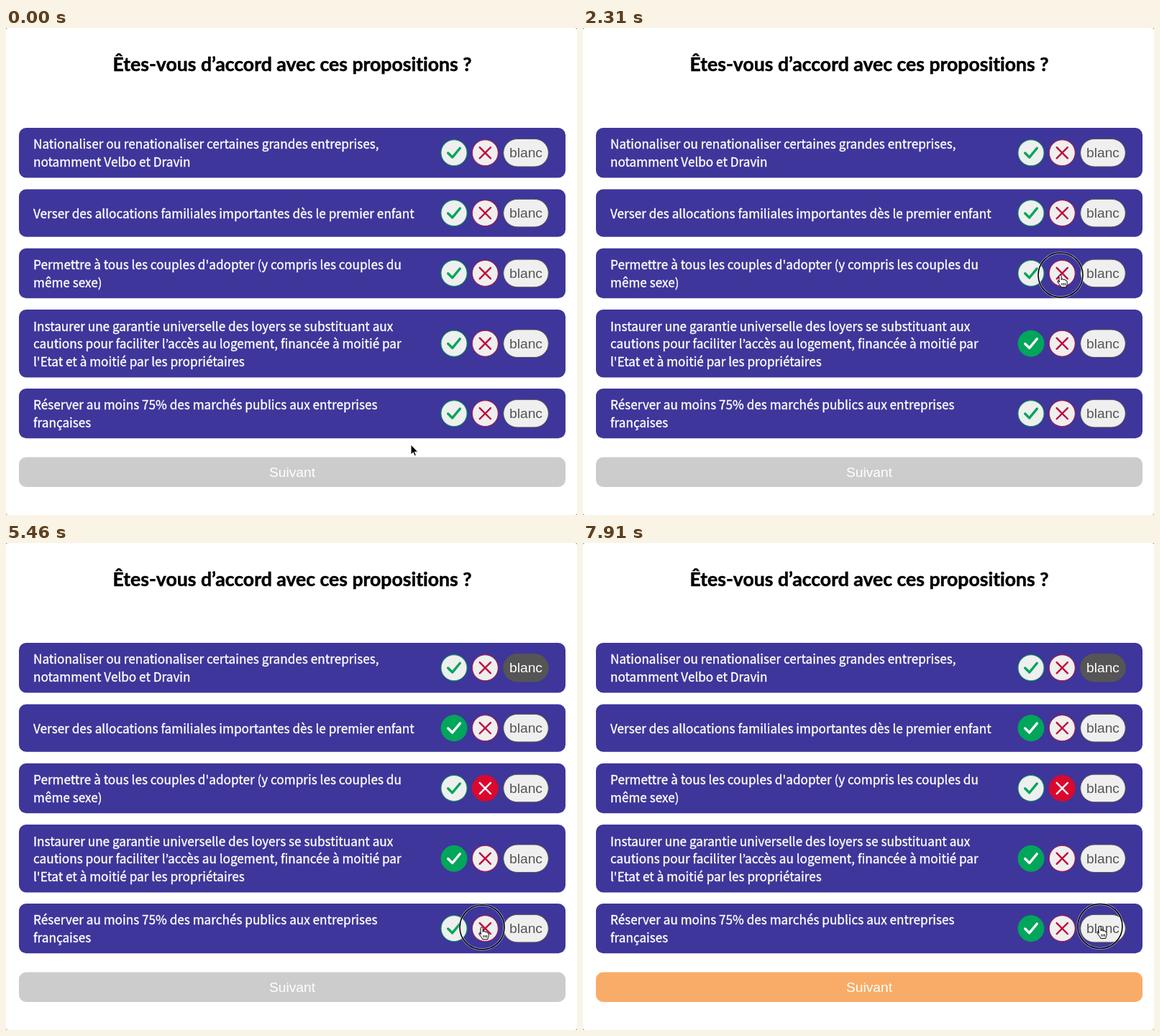
Animation of 794 by 678 pixels, one loop 8 s. Source, as an HTML page:

```html
<!DOCTYPE html>
<html lang="fr">
<head>
<meta charset="utf-8">
<title>Propositions</title>
<style>
  html, body { margin: 0; width: 100%; height: 100%; overflow: hidden; background: #888; }
  svg { display: block; width: 794px; height: 678px; }
  .title { font: 700 26.6px Lato, sans-serif; font-variant-ligatures: none; text-anchor: middle; stroke: #000; stroke-width: .5; }
  .statement { font: 400 17.17px "Noto Sans CJK KR", "Noto Sans CJK JP", sans-serif; fill: #fff; stroke: #fff; stroke-width: .35; }
  .label { font: 19.2px "Liberation Sans", Arial, sans-serif; text-anchor: middle; fill: #fff; }
  .option { --tone: #555; }
  .option.yes { --tone: #00a65a; }
  .option.no { --tone: #c00a3a; }
  .option.no.on { --tone: #da082e; }
  .option .face { fill: #efefef; stroke: var(--tone); stroke-width: 1; }
  .option .mark { fill: none; stroke: var(--tone); stroke-width: 2.4; stroke-linecap: round; stroke-linejoin: round; }
  .option.yes .mark { stroke-width: 3.4; }
  .option .label { fill: var(--tone); }
  .option.on .face { fill: var(--tone); }
  .option.on .mark { stroke: #fff; }
  .option.on .label { fill: #fff; }
</style>
</head>
<body>
<svg id="stage" viewBox="0 0 794 678">
  <rect width="794" height="678" rx="3" fill="#fff"/>
  <text class="title" x="398" y="60">Êtes-vous d’accord avec ces propositions ?</text>
  <g id="rows"></g>
  <rect id="next" x="18" y="597.5" width="760" height="41.5" rx="10"/>
  <text class="label" x="398" y="624.5">Suivant</text>
  <g id="pointer">
    <g id="ring" fill="none">
      <circle r="31" stroke="#fff" stroke-width="3" stroke-opacity=".6"/>
      <circle r="31" stroke="#000" stroke-width="1.6"/>
    </g>
    <path id="arrow" stroke="#fff" d="M0 0v14l3.2-3 2 4.7 2.2-.9-2-4.6h4.4z"/>
    <g id="hand" stroke="#000" stroke-linejoin="round">
      <path fill="#fff" d="M-2 10V1.6a1.6 1.6 0 0 1 3.2 0V6.5q.3-1.2 1.6-1.1 1.3 0 1.5 1.6.4-1 1.6-.8 1.2.2 1.3 1.5 1.8-.3 2 1.4v2.6q0 1.6-1 3.2l-.4 2h-7l-.8-1.6q-1-1.6-3-4.2-1.6-2-1-3 1-1.2 2.4.6z"/>
      <path d="M2 11v3.3M4.3 11v3.3M6.5 11v3.3"/>
    </g>
  </g>
</svg>
<script>
const LOOP = 8000, STEP = 70;
const YES = 0, NO = 1, BLANK = 2;
const KINDS = ["yes", "no", "blank"];
const byId = id => document.getElementById(id);

const rows = [
  { top: 139, height: 69.5, lines: ["Nationaliser ou renationaliser certaines grandes entreprises,", "notamment Velbo et Dravin"] },
  { top: 224.5, height: 66.3, lines: ["Verser des allocations familiales importantes dès le premier enfant"] },
  { top: 306.7, height: 69.5, lines: ["Permettre à tous les couples d'adopter (y compris les couples du", "même sexe)"] },
  { top: 392, height: 94.5, lines: ["Instaurer une garantie universelle des loyers se substituant aux", "cautions pour faciliter l’accès au logement, financée à moitié par", "l'Etat et à moitié par les propriétaires"] },
  { top: 502, height: 69.3, lines: ["Réserver au moins 75% des marchés publics aux entreprises", "françaises"] }
];
for (const row of rows) row.middle = row.top + row.height / 2;

// Pointer stops: time, x, y
const stops = [
  [0, 563, 580], [210, 563, 580], [980, 631, 446], [1050, 626.5, 444],
  [1960, 626.5, 444], [2310, 664, 344], [2730, 664, 344], [3150, 629, 253.5],
  [3500, 629, 253.5], [3850, 719, 178], [4340, 719, 178], [5110, 662, 535],
  [5950, 662, 535], [6300, 526.5, 615], [6440, 526.5, 615], [6790, 624, 535],
  [7210, 624, 535], [7700, 719, 533.5], [LOOP, 719, 533.5]
];
// Clicks: ring start, row, option
const clicks = [
  [1400, 3, YES], [2310, 2, NO], [3220, 1, YES], [3850, 0, BLANK],
  [5390, 4, NO], [6790, 4, YES], [7770, 4, BLANK]
];
const RING_TIME = 280, SELECT_DELAY = 350;

function optionMarkup(kind) {
  if (kind === BLANK)
    return `<rect class="face" x="691.7" y="-19.3" width="62.6" height="38.6" rx="19.3"/>
      <text class="label" x="723" y="6.4">blanc</text>`;
  const x = kind === YES ? 623 : 666.3;
  const mark = kind === YES ? "m-8.3 .3 6 6 10.6-12.8" : "m-7.6-7.6 15.2 15.2m0-15.2-15.2 15.2";
  return `<circle class="face" cx="${x}" r="18"/><path class="mark" d="M${x} 0${mark}"/>`;
}

byId("rows").innerHTML = rows.map(({ top, height, middle, lines }) => `
  <rect x="18" y="${top}" width="760" height="${height}" rx="10" fill="#3e369a"/>
  ${lines.map((line, i) => `<text class="statement" x="38"
    y="${middle + 6.9 + (i - (lines.length - 1) / 2) * 24.6}">${line}</text>`).join("")}
  <g transform="translate(0 ${middle})">
    ${KINDS.map((name, kind) => `<g class="option ${name}">${optionMarkup(kind)}</g>`).join("")}
  </g>`).join("");
const options = [...document.querySelectorAll(".option")];

function pointerAt(t) {
  const i = Math.max(1, stops.findIndex(stop => stop[0] > t));
  const [t0, x0, y0] = stops[i - 1], [t1, x1, y1] = stops[i];
  const p = (t - t0) / (t1 - t0), ease = p * p * (3 - 2 * p);
  return [x0 + (x1 - x0) * ease, y0 + (y1 - y0) * ease];
}

function overButton(x, y, nextEnabled) {
  if (nextEnabled && y > 597 && y < 639) return true;
  return rows.some(({ middle }) => {
    const dy = y - middle;
    const pillX = Math.min(735, Math.max(711, x));
    return [623, 666.3, pillX].some(cx => Math.hypot(x - cx, dy) < 19);
  });
}

const show = (id, visible) => byId(id).setAttribute("visibility", visible ? "visible" : "hidden");

function draw(t) {
  const choices = [];
  for (const [start, row, kind] of clicks)
    if (t >= start + SELECT_DELAY) choices[row] = kind;
  options.forEach((el, i) => el.classList.toggle("on", choices[Math.floor(i / 3)] === i % 3));

  const complete = rows.every((_, i) => choices[i] !== undefined);
  byId("next").setAttribute("fill", complete ? "#f9ac67" : "#ccc");

  const [x, y] = pointerAt(t);
  const hovering = overButton(x, y, complete);
  byId("pointer").setAttribute("transform", `translate(${x} ${y})`);
  show("hand", hovering);
  show("arrow", !hovering);
  show("ring", clicks.some(([start]) => t >= start && t < start + RING_TIME));
}

const origin = performance.now();
function tick() {
  const t = (performance.now() - origin) % LOOP;
  draw(Math.floor(t / STEP) * STEP);
  requestAnimationFrame(tick);
}
tick();
</script>
</body>
</html>
```
